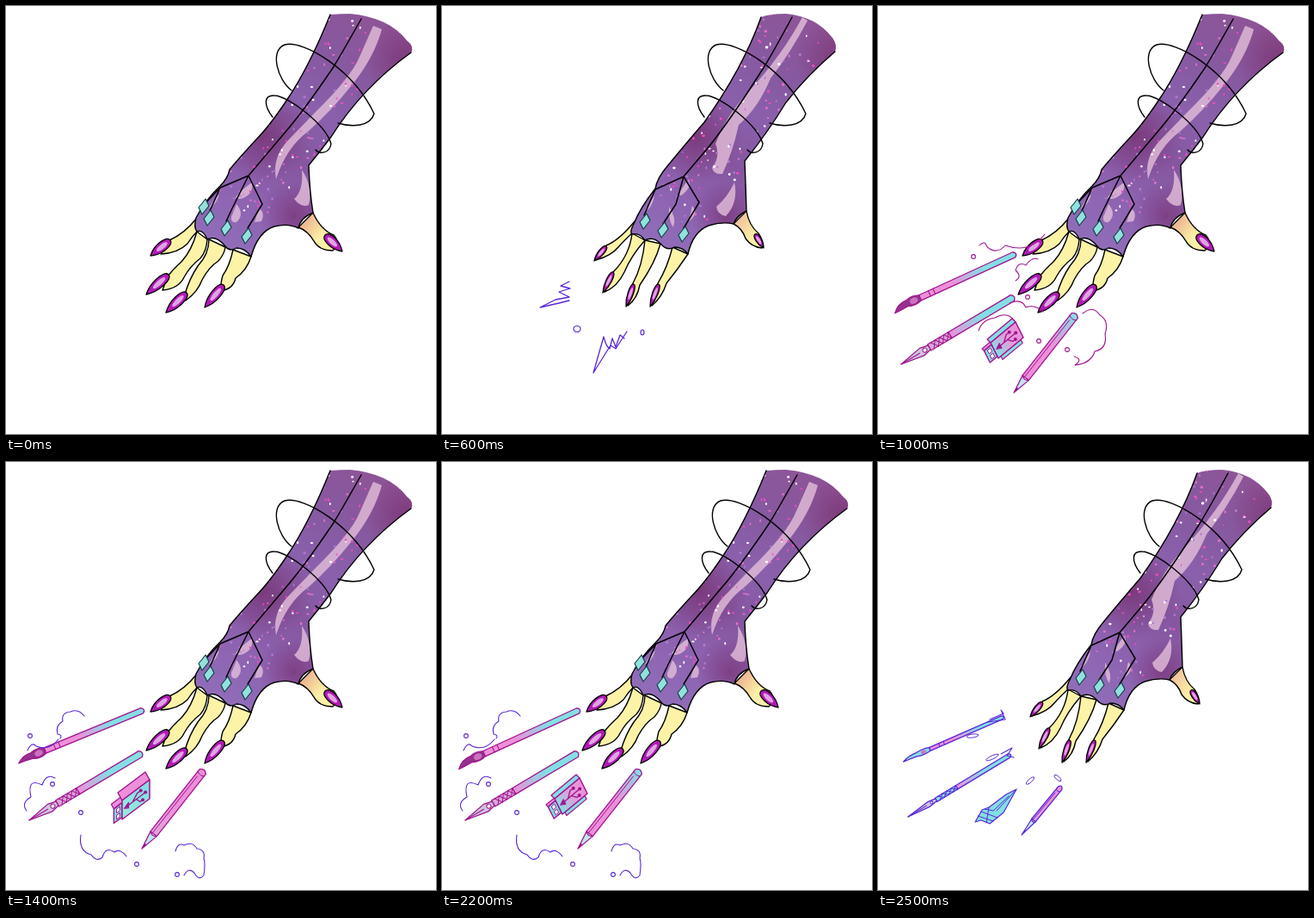
Recreate the animation shown at these times as an HTML page with a canvas. Size 500 by 497 pixels, loop 2.6 s.

```html
<!DOCTYPE html>
<html lang="en">
<head>
<meta charset="utf-8">
<title>Summoning glove</title>
<style>
html, body { margin: 0; width: 100%; height: 100%; overflow: hidden; background: #fff; }
canvas { display: block; }
</style>
</head>
<body>
<canvas id="stage" width="500" height="497"></canvas>
<script>
const ctx = document.getElementById('stage').getContext('2d');
const LOOP = 2600, STEP = 100;
const PURPLE = '#5a27d6', MAGENTA = '#a0148f', CYAN = '#83dfe4', PINK = '#ee8fd9';
ctx.lineJoin = ctx.lineCap = 'round';

function paint(path, fill, ink, width = 1.4) {
  const p = typeof path === 'string' ? new Path2D(path) : path;
  if (fill) { ctx.fillStyle = fill; ctx.fill(p); }
  if (ink) { ctx.strokeStyle = ink; ctx.lineWidth = width; ctx.stroke(p); }
}

function oval(x, y, rx, ry, angle = 0) {
  const p = new Path2D();
  p.ellipse(x, y, rx, ry, angle * Math.PI / 180, 0, 7);
  return p;
}

function shifted(dx, dy, draw) {
  ctx.save();
  ctx.translate(dx, dy);
  draw();
  ctx.restore();
}

// Local x runs from the first point to the second.
function alongAxis([x0, y0, x1, y1], draw) {
  ctx.save();
  ctx.translate(x0, y0);
  ctx.rotate(Math.atan2(y1 - y0, x1 - x0));
  draw(Math.hypot(x1 - x0, y1 - y0));
  ctx.restore();
}

function gradient(x0, y0, x1, y1, ...colors) {
  const g = ctx.createLinearGradient(x0, y0, x1, y1);
  colors.forEach((c, i) => g.addColorStop(i / (colors.length - 1), c));
  return g;
}

function seeded(seed) {
  return () => (seed = (seed * 16807) % 2147483647) / 2147483647;
}

// ---- hand ----
const open = {
  dx: 0, dy: 0, seed: 71, nailWidth: 5.5, skin: '#e8a58c',
  outline: 'M377 10Q352 72 326 110Q306 140 290 156Q268 180 260 190Q258 200 249 209Q231 226 221 246Q218 257 222 262Q229 259 234 271Q244 266 254 278Q260 286 268 281Q278 281 285 291Q293 262 312 256Q328 252 340 258Q342 246 357 240Q353 215 352 185Q366 168 378 152Q414 95 471 54',
  cuff: 'Q475 47 466 40Q445 13 400 9Q388 9 377 10Z',
  thumb: 'M340 257Q351 261 358 273Q364 284 380 284Q390 276 381 266Q366 260 357 240Z',
  fingers: [
    'M222 246Q208 264 190 272L180 288Q200 287 211 276Q216 268 222 262Z',
    'M222 262Q216 284 204 297Q194 306 188 314L182 330Q201 328 207 315Q214 302 226 293Q233 285 234 271Z',
    'M236 271Q236 288 223 302Q213 317 208 335L209 342Q223 332 228 318Q236 303 247 296Q254 288 255 280Z',
    'M264 283Q260 302 252 313Q250 320 249 331Q264 329 267 316Q280 307 285 291Z'
  ],
  nails: [[191, 272, 168, 290], [189, 312, 163, 335], [210, 333, 186, 356], [253, 324, 231, 350], [371, 266, 391, 285]],
  shine: 'M427 23L437 27Q428 60 402 92Q378 122 352 145Q326 164 314 201Q309 176 328 156L360 123Q402 82 412 57Z M344 190Q357 210 352 231Q344 235 335 224Q346 215 344 190Z M286 205Q288 217 278 222Q270 226 267 222Q274 213 286 205Z M268 230Q278 242 268 251Q261 252 262 245Z M294 235Q302 240 297 250L289 251Z M248 219Q245 230 236 235Q241 225 248 219Z',
  seam: 'M413 15Q390 56 380 72Q346 122 326 145L282 197L249 211L229 232M249 211L237 238M282 197L263 235L256 250M282 197L298 230L281 258',
  gems: [[230, 233], [236, 246], [256, 258], [280, 267]]
};
const curled = {
  dx: -13, dy: 13, seed: 1234, nailWidth: 3.4, skin: '#d6908c',
  outline: 'M362 26Q338 86 309 127Q294 150 280 170Q258 188 255 198Q224 232 214 260Q210 272 215 279Q224 276 228 286Q239 281 246 289Q253 298 262 291Q272 291 279 300Q284 276 301 268Q317 263 329 267Q331 256 344 250Q342 216 341 193Q358 173 367 158Q408 101 446 70',
  cuff: 'Q451 65 447 56Q431 19 390 18Q368 17 362 26Z',
  thumb: 'M329 265Q340 273 343 285Q350 293 363 294Q366 283 355 273Q346 266 344 250Z',
  fingers: [
    'M215 262Q198 286 183 292L170 309Q187 305 197 295Q206 286 215 279Z',
    'M214 278Q210 302 190 321L181 345Q195 340 204 322Q212 303 228 286Z',
    'M228 286Q224 316 213 336L207 361Q217 353 221 337Q240 312 246 289Z',
    'M259 292Q254 316 242 334L235 360Q248 351 254 334Q266 319 279 300Z'
  ],
  nails: [[185, 292, 168, 310], [189, 321, 178, 347], [215, 335, 205, 362], [243, 334, 234, 361], [352, 272, 364, 295]],
  shine: 'M412 27Q414 34 405 43Q372 95 341 136Q330 162 302 180Q300 162 318 147Q365 95 384 62Q396 36 412 27Z M307 178Q315 200 309 218Q300 224 297 214Q302 193 307 178Z M335 209Q341 233 332 246Q325 255 321 243Q331 231 335 209Z M278 216Q282 226 269 235Q263 235 278 216Z M282 246Q290 255 278 265Z M254 247Q264 260 260 271Q254 264 254 247Z M238 235Q235 251 226 254Z',
  seam: 'M398 27Q374 68 358 94Q320 154 296 183L272 212L240 228L226 258M272 212L268 233L247 266M272 212L290 241L271 276',
  gems: [[226, 264], [246, 273], [271, 282]]
};
const lifted = {
  dx: -5, dy: 0, seed: 507, nailWidth: 3.2, skin: '#edb59a',
  outline: 'M371 13Q350 72 305 135Q285 158 262 186Q250 200 248 212Q230 235 223 253Q218 262 221 265Q230 263 236 272Q246 267 254 276Q262 285 270 280Q280 280 286 288Q292 262 310 255Q326 250 339 253Q342 244 354 238Q353 205 352 180Q378 148 400 112Q425 80 457 53',
  cuff: 'Q460 45 454 37Q435 12 400 9Q380 9 371 13Z',
  thumb: 'M339 253Q349 258 353 270Q360 280 372 281Q375 274 368 264Q357 255 354 238Z',
  fingers: [
    'M224 250Q206 272 191 278L179 295Q197 290 205 280Q214 270 221 264Z',
    'M221 264Q218 290 199 309L189 332Q204 326 212 309Q220 290 236 272Z',
    'M236 272Q233 302 222 322L216 348Q227 340 230 324Q248 298 254 276Z',
    'M268 280Q262 304 251 322L244 348Q256 338 261 322Q274 306 286 288Z'
  ],
  nails: [[191, 279, 177, 296], [199, 309, 187, 333], [223, 323, 214, 349], [252, 323, 242, 349], [364, 265, 374, 281]],
  shine: 'M419 13L425 17Q405 55 382 84Q368 118 345 138Q338 170 326 195Q316 196 314 188Q324 175 318 160Q330 128 356 100Q395 58 419 13Z M340 205Q345 228 330 244Q320 242 319 233Q332 222 340 205Z M287 201Q291 211 278 220Q272 220 287 201Z M291 232Q299 241 287 250Z M264 233Q273 246 269 257Q263 249 264 233Z M247 220Q244 236 235 239Z',
  seam: 'M407 13Q386 52 375 70Q335 133 309 165L281 198L248 213L235 243M281 198L272 230L257 253M281 198L299 228L281 258',
  gems: [[236, 250], [257, 260], [281, 265]]
};

function drawNail(axis, w) {
  alongAxis(axis, n => {
    paint(`M${n} 0Q${n * .72} ${-w} ${n * .4} ${-w}Q0 ${-w} 0 0Q0 ${w} ${n * .4} ${w}Q${n * .72} ${w} ${n} 0Z`, '#b318b8', '#000', 1.3);
    paint(oval(n * .42, 0, n * .27, w * .5), '#e0a5e6');
  });
}

function drawHand(h) {
  h.fingers.forEach(f => paint(f, '#fcf3a7', '#000'));
  paint(h.thumb, gradient(340 + h.dx, 248 + h.dy, 366 + h.dx, 268 + h.dy, h.skin, '#fcefa6'), '#000');
  h.nails.forEach(axis => drawNail(axis, h.nailWidth));

  const glove = new Path2D(h.outline + h.cuff);
  paint(glove, gradient(425 + h.dx, 20, 260 + h.dx, 275, '#8d5598', '#8659a0', '#8a60ac', '#85569f', '#8d62b0', '#906cb8'));
  ctx.save();
  ctx.clip(glove);
  for (const [x, y, r] of [[300, 150, 55], [465, 62, 50], [335, 244, 40]]) {
    const g = ctx.createRadialGradient(x + h.dx, y + h.dy, 0, x + h.dx, y + h.dy, r);
    g.addColorStop(0, '#72235f88');
    g.addColorStop(1, '#72235f00');
    paint(oval(x + h.dx, y + h.dy, r, r), g);
  }
  paint(h.shine, '#e2bddad0');
  const rnd = seeded(h.seed);
  for (let i = 0; i < 130; i++) {
    const along = rnd(), across = (rnd() - .5) * 95;
    const x = 415 - along * 150 + across * .8, y = 25 + along * 215 + across * .5;
    paint(oval(x + h.dx, y + h.dy, .8 + rnd(), .8 + rnd()), ['#fff', '#f04cc0', '#e46fca', '#b07bd0'][i % 4]);
  }
  ctx.restore();
  paint(h.outline, null, '#000');
  paint(h.seam, null, '#000', 1.5);
  h.gems.forEach(([x, y]) => paint(`M${x + 2} ${y - 9}L${x + 6} ${y - 1}L${x - 2} ${y + 9}L${x - 6} ${y + 1}Z`, '#92e1df', '#164046', 1.2));
  shifted(h.dx, h.dy, () => paint('M332 98C316 86 306 52 324 45C346 39 404 74 428 125C424 140 402 141 386 136M310 129C300 116 299 103 312 104C328 104 372 138 378 160C376 172 364 172 360 167', null, '#000'));
}

// ---- tools ----
const shaft = (end, w) => `M2 ${-w}L${end} ${-w}L${end} ${w}L2 ${w}Q-3 0 2 ${-w}Z`;

function brush(axis, turn, ink, k) {
  alongAxis(axis, n => {
    const w = 3.4 * k, f = n - 34;
    paint(shaft(f, w), gradient(0, 0, f, 0, CYAN, CYAN, PINK, PINK), ink, 1.3);
    paint(`M${f - 18} ${-w}V${w}M${f - 12} ${-w}V${w}`, null, ink, 1);
    const bend = [2, -3, 4][turn] * k;
    paint(`M${f} ${-w}Q${f + 9} ${-7 * k} ${f + 17} ${-3 * k}Q${n - 8} ${-bend} ${n} ${-bend}Q${n - 8} ${5 * k} ${f + 16} ${4 * k}Q${f + 8} ${7 * k} ${f} ${w}Z`,
      k < 1 ? CYAN : turn === 1 ? '#b63a9f' : '#96318e', ink, 1.2);
    paint(oval(f + 8, 0, 5 * k, 3.5 * k), turn === 1 ? PINK : '#ce70c1');
  });
}

function pen(axis, turn, ink, k) {
  alongAxis(axis, n => {
    const w = 4 * k, g = n - 66, b = n - 38;
    const [upper, lower] = turn === 1 ? [9 * k, 2 * k] : [5 * k, 5 * k];
    paint(shaft(g, w), gradient(0, 0, g, 0, CYAN, CYAN, PINK), ink, 1.3);
    paint(`M${g} ${-w}L${b} ${-w}V${w}H${g}Z`, k < 1 ? CYAN : '#dba5d7', ink, 1.2);
    for (let x = g; x < b - 4; x += 6) paint(`M${x} ${-w}L${x + 6} ${w}M${x + 6} ${-w}L${x} ${w}`, null, ink, 1);
    paint(`M${b} ${-w * .7}L${b + 10} ${-upper}L${n} 0L${b + 10} ${lower}L${b} ${w * .7}Z`, turn === 1 ? CYAN : '#cfc4df', ink, 1.3);
    if (turn !== 1) paint(`M${b + 13} 0H${n}`, null, ink, 1);
    paint(oval(b + 6, 0, 2.5 * k, 2.5 * k), '#fff', ink, 1);
  });
}

function pencil(axis, turn, ink, k) {
  alongAxis(axis, n => {
    const w = 4.6 * k, c = n - 22;
    const tones = [[PINK, PINK, '#e6a0dc'], [PINK, CYAN, CYAN], [CYAN, PINK, PINK]][turn];
    paint(shaft(c, w), gradient(0, 0, c, 0, ...tones), ink, 1.3);
    paint(`M5 ${-w}Q9 0 5 ${w}M10 ${w * .35}H${c}`, null, ink, .9);
    paint(`M${c} ${-w}L${n} 0L${c} ${w}Q${c + 4} 0 ${c} ${-w}Z`, '#bfe5ec', ink, 1.2);
    paint(`M${n - 7} ${-w * .3}L${n} 0L${n - 7} ${w * .3}Z`, ink);
  });
}

const stickViews = [
  { a: [167, 369], b: [167, 391], len: [-32, 24], edge: [-5, -9] },
  { a: [156, 372], b: [172, 387], len: [-29, 30], edge: [0, 0] },
  { a: [160, 367], b: [169, 385], len: [-29, 24], edge: [-4, -4] }
];

function stick(turn) {
  const { a, b, len, edge } = stickViews[turn];
  // u across the face, v from the back to the plug, e towards the far edge
  const point = (u, v, e = 0) => [0, 1].map(i => a[i] + (b[i] - a[i]) * u + len[i] * v + edge[i] * e);
  const at = (...uve) => point(...uve).join(' ');
  const quad = (u0, v0, u1, v1) => `M${at(u0, v0)}L${at(u1, v0)}L${at(u1, v1)}L${at(u0, v1)}Z`;
  const side = (u, v0, v1, e) => `M${at(u, v0)}L${at(u, v0, e)}L${at(u, v1, e)}L${at(u, v1)}Z`;
  paint(side(.12, .9, 1.3, .6), PINK, MAGENTA, 1.2);
  paint(quad(.12, 1, .88, 1.3), CYAN, MAGENTA, 1.4);
  paint(quad(.25, 1.08, .45, 1.2) + quad(.58, 1.08, .78, 1.2), '#fff', MAGENTA, 1);
  paint(side(0, 0, 1, 1), turn ? CYAN : PINK, MAGENTA, 1.4);
  if (turn === 2) paint(quad(1, .1, 1.22, .9), CYAN, MAGENTA, 1.2);
  const tones = turn ? [PINK, '#dfa0d9', CYAN] : [CYAN, '#96e8dd'];
  paint(quad(0, 0, 1, 1), gradient(...point(.5, 0), ...point(.5, 1), ...tones), MAGENTA, 1.5);
  paint(`M${at(.5, .15)}L${at(.5, .82)}M${at(.5, .62)}L${at(.22, .45)}L${at(.22, .32)}M${at(.5, .48)}L${at(.78, .35)}L${at(.78, .25)}`, null, MAGENTA, 1.3);
  paint(`M${at(.5, .92)}L${at(.35, .76)}L${at(.65, .76)}Z`, MAGENTA, MAGENTA, 1);
  for (const [u, v] of [[.5, .15], [.22, .32], [.78, .25]]) paint(oval(...point(u, v), 2, 2), MAGENTA);
}

function drawTools(turn) {
  brush([160, 288, ...[[14, 348], [19, 361], [18, 353]][turn]], turn, MAGENTA, 1);
  pen([158, 338, 27, turn === 1 ? 411 : 416], turn, MAGENTA, 1);
  stick(turn);
  pencil([230, 358, 158, 449], turn, MAGENTA, 1);
}

function drawFadingTools(k) {
  brush([146, 296, 29, 347], 0, PURPLE, k);
  pen([154, 340, 35, 412], 0, PURPLE, k);
  pencil([213, 377, 167, 433], 0, PURPLE, k);
  paint('M161 380L149 386L129 401L121 404L113 418L120 416L130 420L146 407Z', CYAN, PURPLE, 1.2);
  paint('M116 411L134 417M120 406L139 413M124 403L134 405L152 388M129 401L126 419M161 380L138 405', null, PURPLE, 1);
  paint('M130 299L146 292L143 288L148 299L128 302M143 339L156 332L150 341L158 343', null, PURPLE, 1.1);
  [[110, 318, 7, -8], [133, 343, 8, -25], [177, 370, 6, -42], [209, 367, 5, 40]].forEach(([x, y, r, a]) => paint(oval(x, y, r, 2, a), '#fff', PURPLE, 1));
}

// ---- magic ----
const nearSmoke = 'M118 278Q124 271 127 280Q138 289 148 278Q176 288 194 265M160 319Q168 314 160 307Q163 296 172 301Q179 291 186 294M117 377Q121 364 136 362Q151 354 159 366M153 345Q167 339 172 350Q182 346 192 355M238 357Q250 347 258 359Q269 365 264 381Q267 398 252 401Q248 415 229 417Q239 410 228 407';
const farSmoke = 'M25 335Q30 324 35 330Q50 336 61 322M63 321Q66 317 60 316Q57 306 66 301Q64 291 75 290Q84 286 91 295M57 367Q47 361 42 375Q24 366 29 389Q17 396 24 405M87 433Q84 452 99 456Q105 465 112 459Q116 446 126 453Q132 448 140 458M197 452Q200 441 207 445Q217 440 222 449Q232 450 230 460Q232 466 230 480Q224 487 219 477Q212 470 207 480';
const nearRings = [[111, 291], [174, 338], [187, 389], [220, 399]];
const farRings = [[28, 318], [54, 374], [87, 407], [152, 467], [199, 479]];

function smoke(path, rings, ink, dx, dy) {
  shifted(dx, dy, () => {
    paint(path, null, ink, 1.1);
    rings.forEach(([x, y]) => paint(oval(x, y, 2.4, 2.4), null, ink, 1.1));
  });
}

function drawSmoke(phase) {
  if (phase < 2) smoke(nearSmoke, nearRings, MAGENTA, -10 * phase, 8 * phase);
  else if (phase < 6) smoke(farSmoke, farRings, PURPLE, Math.max(-7, (4 - phase) * 11), Math.min(3, (phase - 4) * 9));
}

function drawSparks(dx, dy) {
  shifted(dx, dy, () => {
    paint('M168 296L158 301L169 304L156 308L168 314L152 317L134 326L156 321L168 318M196 402L208 360Q211 372 215 374L218 362L222 372L227 358L232 362M196 402L216 370L222 374L235 354', null, PURPLE, 1.3);
    paint(oval(177, 351, 4, 3.5), null, PURPLE, 1.2);
    paint(oval(253, 355, 2, 3), null, PURPLE, 1.2);
  });
}

function drawBolts(dx, dy) {
  shifted(dx, dy, () => {
    paint('M136 308L117 310L131 315L115 318L128 321L112 324L68 345L104 338L110 343L104 331', null, PURPLE, 1.2);
    paint('M93 361L102 364L88 370L100 370L80 379L37 409L76 386L96 388L86 381', null, PURPLE, 1.2);
    paint('M89 403L95 409L87 412L98 414L85 432L64 478L96 424L101 430L110 420L110 428L117 424', null, PURPLE, 1.2);
    paint('M125 436L132 433L128 446L139 432L120 474L142 438L146 446L150 439L151 445L158 438', null, PURPLE, 1.2);
    paint('M174 442L182 436L179 450L192 434L175 468L198 478Q187 468 199 441L202 446L209 436', null, PURPLE, 1.2);
    paint(oval(213, 430, 2, 2), null, PURPLE, 1.1);
  });
  paint('M255 354Q250 353 251 358Q252 362 255 360M170 307L173 308', null, PURPLE, 1.1);
}

function drawScene(s) {
  ctx.fillStyle = '#fff';
  ctx.fillRect(0, 0, 500, 497);
  drawHand({ 5: curled, 6: lifted, 23: curled, 24: lifted, 25: lifted }[s] || open);

  if (s === 5) drawSparks(0, 0);
  if (s === 6) drawSparks(-20, 24);
  if (s === 7) drawBolts(24, -26);
  if (s === 8) drawBolts(0, 0);
  if (s === 9) drawFadingTools(.6);
  if (s >= 10 && s < 24) {
    const shown = s === 11 ? 10 : s;
    drawTools((shown + 1) % 3);
    if (s < 23) drawSmoke((shown - 10) % 8);
  }
  if (s >= 24) drawFadingTools(s === 24 ? .8 : .6);
}

function tick(now) {
  drawScene(Math.floor((now % LOOP) / STEP));
  requestAnimationFrame(tick);
}
requestAnimationFrame(tick);
</script>
</body>
</html>
```
